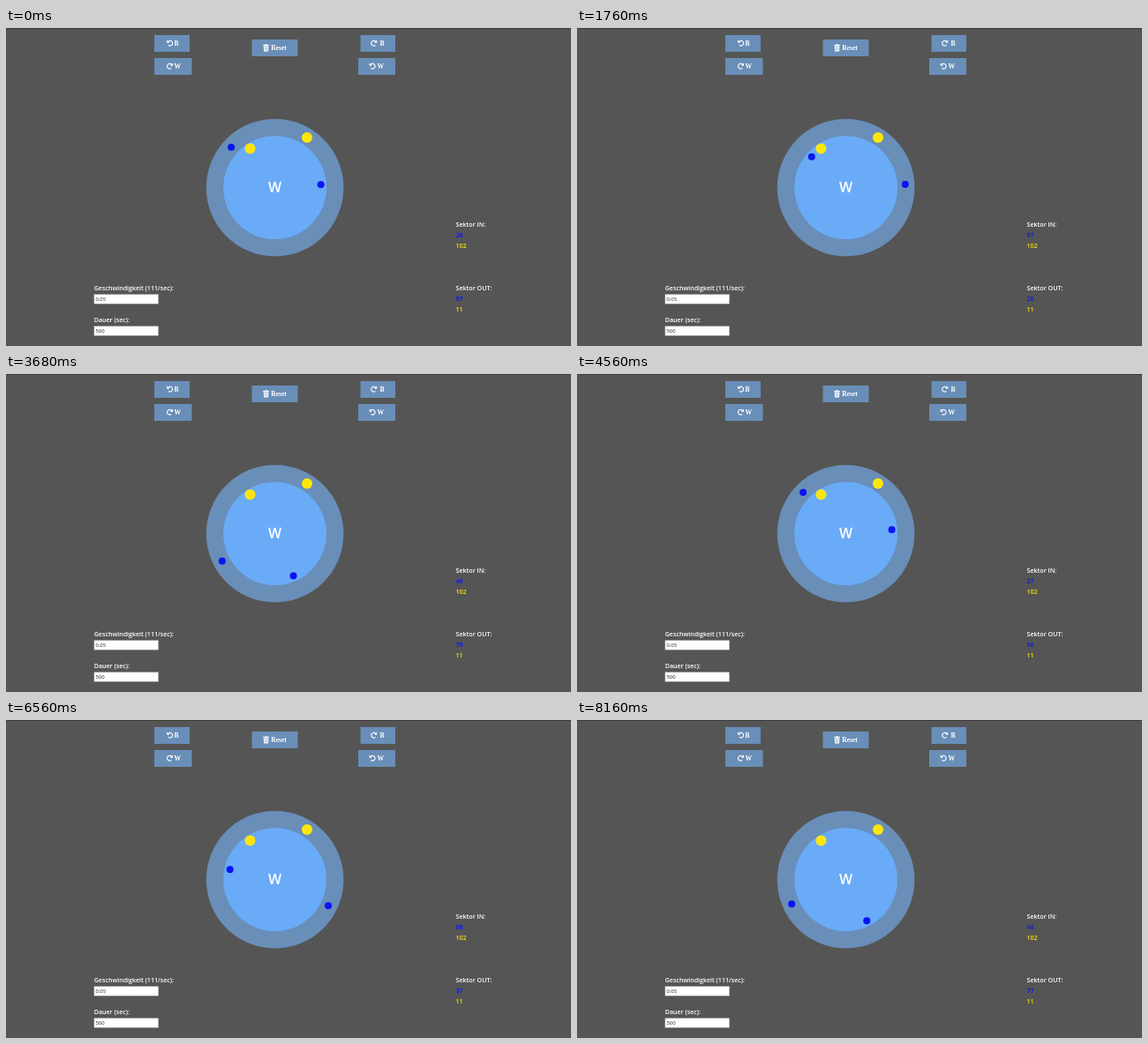
Animation of 640x360 px, one loop 8240 ms. Source, as an HTML page:

```html
<!DOCTYPE html>
<html lang="de">
<head>
<meta charset="utf-8">
<style>
html, body { margin: 0; width: 100%; height: 100%; overflow: hidden; background: #555; }
svg { display: block; width: 640px; height: 360px; }
text { font: 600 7.1px "Open Sans", "Noto Sans", sans-serif; fill: #fff; }
.button text { font: bold 7.6px "Liberation Serif", serif; }
.button rect { fill: #698eb8; }
.field rect { fill: #fff; stroke: #858585; stroke-width: .6; }
.field text { font-size: 5.9px; font-weight: 400; fill: #222; }
text.big { font-size: 16px; text-anchor: middle; }
.blue { fill: #0a14f5; }
.yellow { fill: #ffe60a; }
</style>
</head>
<body>
<svg viewBox="0 0 640 360">
  <defs>
    <g id="undo">
      <path d="M-2.5-1.4A2.85 2.85 0 1 1-1.9 2.1" fill="none" stroke="#fff" stroke-width="1.15"/>
      <path d="M-3.6-3.7V-.5H-.4Z" fill="#fff"/>
    </g>
  </defs>
  <rect width="640" height="1" fill="#3c3c3c"/>

  <g class="button">
    <rect x="168" y="8" width="40" height="19"/>
    <use href="#undo" x="185.8" y="17.3"/><text x="190.4" y="20">B</text>
    <rect x="168" y="34" width="42.5" height="19"/>
    <use href="#undo" transform="translate(185.4 43.3) scale(-1 1)"/><text x="190.4" y="46">W</text>
    <rect x="401.5" y="8" width="39.5" height="19"/>
    <use href="#undo" transform="translate(416.6 17.3) scale(-1 1)"/><text x="423.4" y="20">B</text>
    <rect x="399" y="34" width="42" height="19"/>
    <use href="#undo" x="415.2" y="43.3"/><text x="420.5" y="46">W</text>
    <rect x="278.5" y="13" width="52" height="19"/>
    <path d="M291.2 19h2l.5-.7h1.8l.5.7h2v1h-6.8ZM291.7 20.5h5.8l-.4 6h-5Z" fill="#fff"/>
    <path d="M293.2 21.5v4M294.6 21.5v4M296 21.5v4" stroke="#698eb8" stroke-width=".5"/>
    <text x="300.2" y="25.2">Reset</text>
  </g>

  <circle cx="304.6" cy="180.7" r="77.8" fill="#698eb8"/>
  <circle cx="304.6" cy="180.7" r="58.4" fill="#6aabf8"/>
  <text class="big" x="304.6" y="186">W</text>
  <circle class="yellow" cx="276.5" cy="136.5" r="6"/>
  <circle class="yellow" cx="341" cy="124" r="6"/>
  <circle class="blue" id="inDot" r="4"/>
  <circle class="blue" id="outDot" r="4"/>

  <text x="509.5" y="224.5">Sektor IN:</text>
  <text class="blue" id="inText" x="509.5" y="237"/>
  <text class="yellow" x="509.5" y="249">102</text>
  <text x="509.5" y="296.5">Sektor OUT:</text>
  <text class="blue" id="outText" x="509.5" y="309"/>
  <text class="yellow" x="509.5" y="321">11</text>

  <text x="99.7" y="296.5">Geschwindigkeit (111/sec):</text>
  <text x="99.7" y="332.5">Dauer (sec):</text>
  <g class="field">
    <rect x="99.8" y="301.3" width="73" height="11"/><text x="101.4" y="309.2">0.05</text>
    <rect x="99.8" y="337.3" width="73" height="11"/><text x="101.4" y="345.2">500</text>
  </g>
</svg>
<script>
const SECTORS = 111, STEP = 80, LOOP = 8240;
const el = id => document.getElementById(id);
const wrap = k => ((k - 1) % SECTORS + SECTORS) % SECTORS + 1;

function place(name, sector, radius) {
  const a = (sector - 1) / SECTORS * 2 * Math.PI;
  const dot = el(name + "Dot");
  dot.setAttribute("cx", 304.6 + radius * Math.sin(a));
  dot.setAttribute("cy", 180.7 - radius * Math.cos(a));
  el(name + "Text").textContent = wrap(Math.round(sector));
}

function draw(now) {
  const n = Math.floor(now % LOOP / STEP);
  // slightly slower start, then two sectors per step
  const sector = n < 11 ? 27.6 - 1.764 * n : 8.2 - 2 * (n - 11);
  place("in", sector, 52.2);
  place("out", 125 - sector, 67.3);
}

const start = performance.now();
function tick() {
  draw(performance.now() - start);
  requestAnimationFrame(tick);
}
tick();
</script>
</body>
</html>
```
